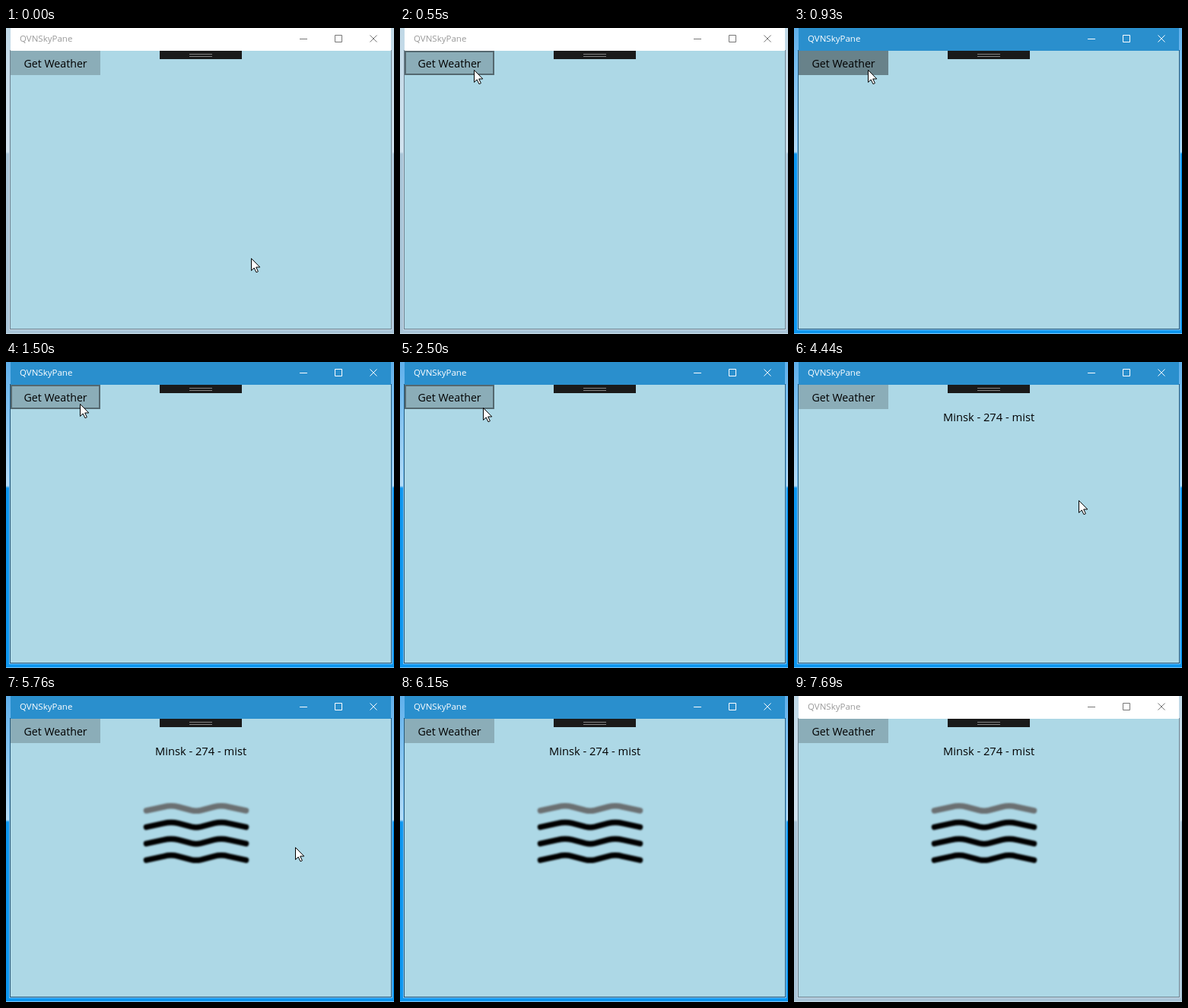
These frames come from a looping animation (510 px wide and 403 px high, 7.84 s). An HTML page with a canvas:

```html
<!DOCTYPE html>
<html lang="en">
<head>
<meta charset="utf-8">
<title>Weather app</title>
<style>
  html, body { margin: 0; width: 100%; height: 100%; overflow: hidden; background: #add8e6; }
  canvas { display: block; }
</style>
</head>
<body>
<canvas id="stage" width="510" height="403"></canvas>
<script>
const ctx = document.getElementById('stage').getContext('2d');
const LOOP = 7840;
const FONT = '"Open Sans", "Noto Sans", sans-serif';

const ACTIVE = { title: '#2a8fcd', text: '#fff', icons: '#fff', line: '#24587c',
                 top: '#5fb0ec', middle: '#b4dcf7', bottom: '#0d96ef', edge: '#7cc4f5' };
const INACTIVE = { title: '#fff', text: '#999', icons: '#777', line: '#6f8391',
                   top: '#c0d8e6', middle: '#d2e3ef', bottom: '#a9c5d8', edge: '#c6dbe8' };

// Cursor moves: start, end, number of jumps, and the two end points.
const MOVES = [
  { start: 70, end: 320, steps: 5, from: [322, 303], to: [97, 65] },
  { start: 470, end: 550, steps: 2, from: [97, 65], to: [97, 55] },
  { start: 2430, end: 2960, steps: 8, from: [97, 55], to: [374, 182] },
  { start: 5760, end: 6150, steps: 6, from: [374, 182], to: [457, 417] }
];

// Share of a stepped change that has happened; the first step falls on start.
function stepped(t, start, end, n) {
  if (t < start) return 0;
  return Math.min(n, 1 + Math.floor((t - start) / (end - start) * (n - 1))) / n;
}

const smooth = p => p * p * (3 - 2 * p);

function rect(color, x, y, w, h) {
  ctx.fillStyle = color;
  ctx.fillRect(x, y, w, h);
}

function text(value, x, y, size, color = '#000', align = 'left') {
  ctx.font = `${size}px ${FONT}`;
  ctx.textAlign = align;
  ctx.fillStyle = color;
  ctx.fillText(value, x, y);
}

function stroke(path, color, width = 1) {
  ctx.strokeStyle = color;
  ctx.lineWidth = width;
  ctx.stroke(new Path2D(path));
}

function cursorAt(t) {
  const move = MOVES.findLast(m => t >= m.start) || MOVES[0];
  const p = smooth(stepped(t, move.start, move.end, move.steps));
  return move.from.map((a, i) => Math.round(a + (move.to[i] - a) * p));
}

function drawWindow(theme) {
  const frame = ctx.createLinearGradient(0, 0, 0, 403);
  frame.addColorStop(0, theme.top);
  frame.addColorStop(163 / 403, theme.middle);
  frame.addColorStop(166 / 403, theme.bottom);
  frame.addColorStop(1, theme.bottom);
  rect(frame, 0, 0, 510, 403);
  rect(theme.edge, 4, 30, 504, 368);
  rect(theme.edge, 0, 402, 510, 1);
  rect(theme.line, 5, 29, 502, 368);
  rect('#add8e6', 6, 30, 500, 366);
  rect(theme.title, 6, 0, 500, 30);
  text('QVNSkyPane', 18, 18, 11.5, theme.text);

  stroke('M386 14.5h10 M432.5 9.5h9v9h-9z', theme.icons);
  stroke('M478.5 9.5l9 9m0 -9l-9 9', theme.icons);

  rect('#1a1a1a', 202, 30, 108, 11);
  rect('#858585', 241, 34, 30, 1);
  rect('#858585', 241, 37, 30, 1);
}

function drawButton(t, [cx, cy]) {
  const pressed = t >= 930 && t < 1250;
  const hover = cx >= 6 && cx < 124 && cy >= 30 && cy < 62;
  const sink = Math.max(0, stepped(t, 930, 1100, 3) * 1.5 - 0.5) - stepped(t, 1250, 1500, 4);
  const scale = 1 - 0.02 * sink;

  ctx.save();
  ctx.translate(65, 46);
  ctx.scale(scale, scale);
  ctx.translate(-65, -46);
  rect(pressed ? 'rgba(0,0,0,.4)' : 'rgba(0,0,0,.2)', 6, 30, 118, 32);
  if (hover && !pressed) stroke('M7 31h116v30h-116z', 'rgba(0,0,0,.4)', 2);
  text('Get Weather', 23.5, 52, 14.2);
  ctx.restore();
}

function drawMist() {
  ctx.save();
  ctx.filter = 'blur(1.2px)';
  ctx.lineCap = 'round';
  ctx.lineJoin = 'round';
  for (let i = 0; i < 4; i++) {
    const y = 151 + i * 21.7;
    stroke(`M184.5 ${y}l23 -5q9.5 -2.5 19 0l17 4.5q6.5 1.5 13 0l17 -4.5q9.5 -2.5 19 0l23 5`,
           i ? '#000' : '#6b7072', 7.5);
  }
  ctx.restore();
}

function drawCursor([x, y]) {
  ctx.save();
  ctx.translate(x + 0.5, y + 0.5);
  const arrow = 'M0 0V16L3.7 12.5L6.5 18.3L8.9 17.2L6.2 11.5H11.3Z';
  ctx.fillStyle = '#fff';
  ctx.fill(new Path2D(arrow));
  stroke(arrow, '#000');
  ctx.restore();
}

function draw() {
  const t = performance.now() % LOOP;
  const cursor = cursorAt(t);
  drawWindow(t >= 930 && t < 7690 ? ACTIVE : INACTIVE);
  drawButton(t, cursor);
  if (t >= 4440) text('Minsk - 274 - mist', 256, 78, 14.7, '#000', 'center');
  if (t >= 4520) drawMist();
  drawCursor(cursor);
  requestAnimationFrame(draw);
}
draw();
</script>
</body>
</html>
```
